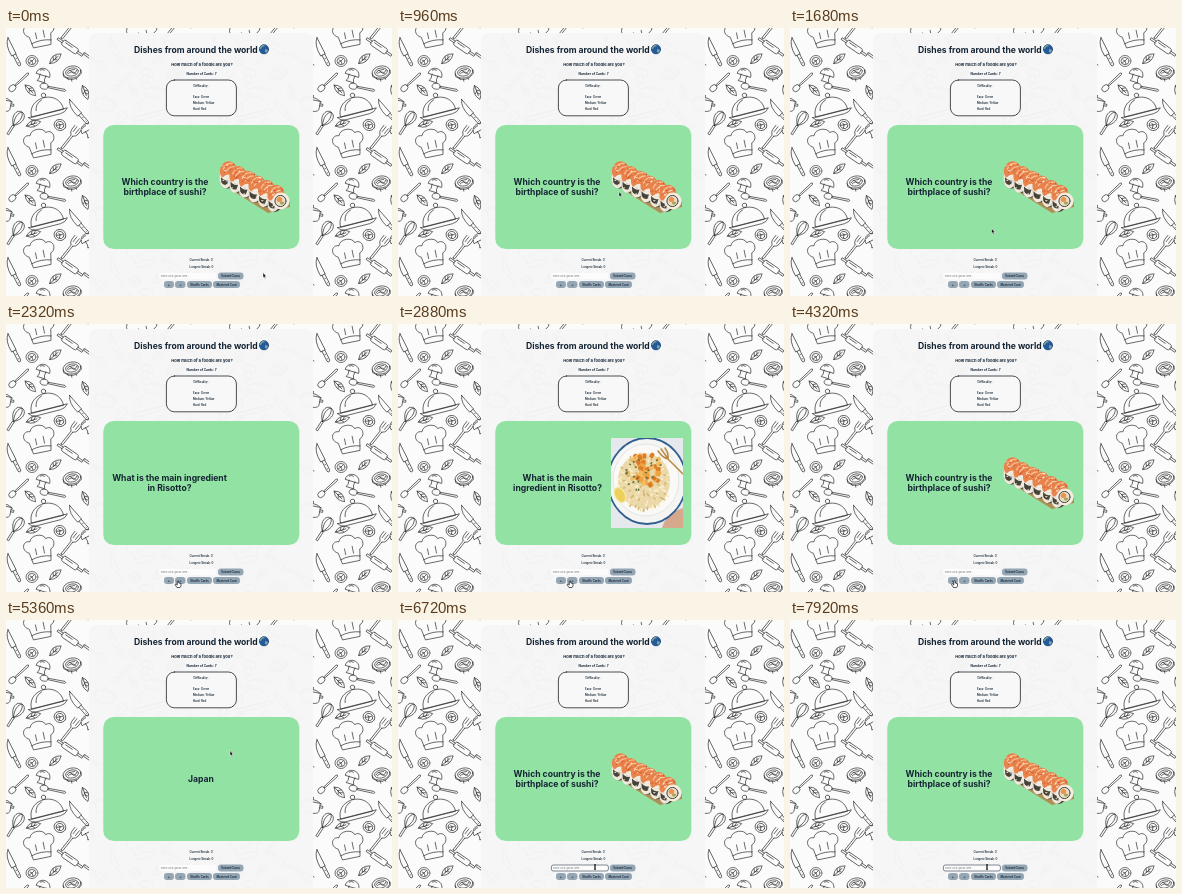
An HTML page with a canvas for the animation above (8 s loop, 386 by 268 pixels).

```html
<!DOCTYPE html>
<html lang="en">
<head>
<meta charset="utf-8">
<title>Dishes from around the world</title>
<style>
html, body { margin: 0; width: 100%; height: 100%; overflow: hidden; background: #fbfbfb; }
canvas { display: block; width: 386px; height: 268px; }
</style>
</head>
<body>
<canvas id="stage"></canvas>
<script>
const W = 386, H = 268, LOOP = 8000, TAU = Math.PI * 2;
const INK = '#142434', GREEN = '#92e2a3';
const canvas = document.getElementById('stage');
const scale = window.devicePixelRatio || 1;
canvas.width = W * scale;
canvas.height = H * scale;
let g = canvas.getContext('2d');

function at(x, y, angle, draw) {
  g.save();
  g.translate(x, y);
  g.rotate(angle);
  draw();
  g.restore();
}
function paint(path, fill, stroke, width) {
  if (fill) { g.fillStyle = fill; g.fill(path); }
  if (stroke) { g.strokeStyle = stroke; g.lineWidth = width; g.stroke(path); }
}
function box(x, y, w, h, r, fill, stroke, width = 1) {
  const path = new Path2D();
  path.roundRect(x, y, w, h, r);
  paint(path, fill, stroke, width);
}
function oval(x, y, rx, ry, fill, stroke, width = 1, angle = 0) {
  const path = new Path2D();
  path.ellipse(x, y, rx, ry, angle, 0, TAU);
  paint(path, fill, stroke, width);
}
function shape(d, fill, stroke, width = 1) {
  paint(new Path2D(d), fill, stroke, width);
}
function text(s, x, y, size, weight = 400, align = 'center', color = INK) {
  g.font = `${weight} ${size}px Inter, sans-serif`;
  g.textAlign = align;
  g.fillStyle = color;
  g.fillText(s, x, y + size * 0.36);
}
// Repeatable pseudo-random numbers.
function random(seed) {
  return () => (seed = (seed * 16807) % 2147483647) / 2147483647;
}

// Kitchen doodles, each drawn around its own centre.
const PEN = '#2b2b2b', NIB = 0.65;
const line = d => shape(d, null, PEN, NIB);
const ring = (rx, ry, y = 0, x = 0) => oval(x, y, rx, ry, null, PEN, NIB);
const doodles = {
  cloche() {
    line('M-17 8C-17-13 16-13 16 8ZM-20 8H20Q17 12 12 12H-13Q-18 12-20 8M-11 3Q-10-4-3-6');
    ring(2.2, 2.2, -10);
  },
  hat() {
    line('M-9 11L-11 0C-19-4-15-14-8-11C-6-18 7-17 8-11C16-14 18-2 11 0L9 11ZM-10 7Q0 4 10 7M-4 3V-3M4 3V-4');
  },
  knife() {
    line('M-15-2H3V3Q-10 4-15-2ZM3-1.5H14Q17 0 14 1.5H3M7 0H7.5M12 0H12.5');
  },
  pin() {
    box(-9, -3, 18, 6, 2, null, PEN, NIB);
    line('M-9-1H-15V1H-9M9-1H15V1H9M-6-1H2');
  },
  whisk() {
    line('M-13-1H-3V1H-13ZM-3 0C4-8 13-6 13 0C13 6 4 8-3 0M-3 0C5-4 10-3 13 0C10 3 5 4-3 0');
  },
  spoon() {
    ring(4, 3, 0, -9);
    line('M-5-.7L12-1Q14 0 12 1L-5 .7');
  },
  roll() {
    ring(9, 6);
    ring(6.5, 4);
    line('M-9 0V3Q0 12 9 3V0M-5 0Q-2-4 0 0T5-1M-4 1Q0-2 3 2M-2-2L3-2M-6 5L-5 7M-2 7V9M3 7V8');
  },
  fork() {
    line('M-13-1H3Q5-4 8-4H13M3 1Q5 4 8 4H13M-13-1Q-15 0-13 1H3M7-1.5H13M7 1.5H13');
  },
  mushroom() {
    line('M-7 0C-7-9 7-9 7 0ZM-3 0Q-2 5-4 7H4Q2 5 3 0M-4-4Q-2-6 0-5');
  },
  tomato() {
    ring(6, 5.5);
    ring(4, 3.6);
    line('M-2-1L0 0L2-2M0 0L1 3M-3 2L0 0');
  },
  leaf() {
    line('M-7 0Q0-7 8 0Q0 6-7 0L4 0M-2 0L0-3M1 0L3-2M-1 0L1 2');
  },
  pot() {
    line('M-9-3V5Q-8 8 0 8Q8 8 9 5V-3ZM-9-1H-12V1H-9M9-1H12V1H9M-10-3Q0-9 10-3M-1-6V-8H1V-6');
  }
};
const tile = [
  ['cloche', 40, 77, -0.25], ['hat', 34, 117, -0.2], ['roll', 66, 44, -0.2],
  ['knife', 72, 84, 0.85], ['pin', 64, 19, 0.6], ['whisk', 9, 95, -1],
  ['spoon', 13, 54, -0.75], ['fork', 64, 110, -0.9], ['mushroom', 37, 47, 0.3],
  ['pot', 99, 75, 0.2], ['knife', 7, 24, 1.1], ['fork', 89, 33, 0.6],
  ['tomato', 26, 33, 0], ['leaf', 49, 31, -0.7], ['leaf', 24, 62, 0.8],
  ['tomato', 54, 97, 0.5], ['spoon', 47, 60, 0.2], ['leaf', 79, 64, 1.2],
  ['mushroom', 82, 102, -0.5], ['leaf', 27, 96, -0.3]
];
function wallpaper() {
  g.fillStyle = '#fbfbfb';
  g.fillRect(0, 0, W, H);
  g.lineCap = g.lineJoin = 'round';
  for (let col = -1; col < 4; col++)
    for (let row = -1; row < 3; row++)
      for (const [name, x, y, angle] of tile)
        at(x + col * 103, y + row * 110, angle, doodles[name]);
}

function globe() {
  g.save();
  g.beginPath();
  g.arc(258, 21.3, 4.8, 0, TAU);
  g.clip();
  g.fillStyle = '#235b9d';
  g.fillRect(253, 16, 10, 11);
  shape('M254 17L258 16.5L259 18L256 19L255 21L253 21ZM259 21L262 22L261 25L259 24Z', '#80a79d');
  g.restore();
  oval(258, 21.3, 4.6, 4.6, null, '#18396d', 0.5);
}

function button(label, x, y, w) {
  box(x, y, w, 7, 3, '#94a5b4');
  text(label, x + w / 2, y + 3.7, 2.8, 600);
}

function page() {
  wallpaper();
  box(83, 5, 224, 270, 7, 'rgba(246,246,246,.97)');
  text('Dishes from around the world', 128, 22.2, 8.6, 700, 'left');
  globe();
  text('How much of a foodie are you?', 196, 36.4, 4.1, 700);
  text('Number of Cards: 7', 195.5, 45.6, 3.2, 700);
  box(160.4, 52, 70, 35.8, 8, '#f8f8f8', '#10151a', 0.75);
  text('Difficulty:', 195, 58, 3.2, 600);
  ['Easy: Green', 'Medium: Yellow', 'Hard: Red'].forEach((s, i) =>
    text(s, 187, 69.1 + i * 6, 2.8, 600, 'left'));
  box(97.3, 97, 196, 124, 10.5, GREEN);
  text('Current Streak: 0', 195, 232.2, 2.8, 600);
  text('Longest Streak: 0', 195.5, 239.2, 2.8, 600);
  box(153, 245, 57, 6, 2, '#fcfcfc');
  text('Place your guess here...', 155, 248.2, 2.5, 400, 'left', '#656c73');
  button('Submit Guess', 212, 244.5, 25.5);
  button('←', 158, 253, 10);
  button('→', 169, 253, 10.5);
  button('Shuffle Cards', 181, 253, 25);
  button('Mastered Card', 207, 253, 27);
}

function sushi() {
  const rnd = random(71);
  const piece = () => {
    oval(0, 3, 8, 11.5, '#3a3a31');
    oval(-1.4, 3, 7, 11.5, '#f1eadf');
    shape('M-7 4Q-3 8 1 6L0 11Q-4 12-6 9Z', '#46443a');
    shape('M-9-2C-9-17 8-15 8-3Q7 3 3 1Q-2-1-5 4Q-8 4-9-2Z', '#e8834c');
    shape('M-6-4Q-4-11 2-11M-3-2Q0-8 5-8', null, '#f9c39c', 1.2);
    for (let k = 0; k < 12; k++)
      oval(rnd() * 13 - 7, rnd() * 11 - 11, 0.8, 0.6, k % 3 ? '#cf5528' : '#fff1de');
    for (let k = 0; k < 8; k++)
      oval(rnd() * 9 - 5, rnd() * 10 + 3, 1, 0.6, '#ded5c4');
  };
  g.lineCap = 'round';
  shape('M214 155L262 185L284 179V174L250 158Z', '#b08f57');
  for (let i = 0; i < 6; i++)
    at(222.5 + i * 9.5, 146 + i * 4.7, 0.15, piece);
  oval(275, 173, 8.5, 8.5, '#f4eee3');
  oval(274.5, 173, 5.6, 5.6, '#e9ddca', '#45443a', 1);
  oval(273.5, 171.5, 2.7, 2.6, '#e9934c');
  oval(276, 175, 2.2, 1.6, '#a4a653');
}

function risotto() {
  const rnd = random(29);
  const scatter = (count, cx, cy, rx, ry, draw) => {
    for (let i = 0; i < count; i++) {
      const a = rnd() * TAU, r = Math.sqrt(rnd());
      at(cx + Math.cos(a) * rx * r, cy + Math.sin(a) * ry * r, a, () => draw(i));
    }
  };
  g.save();
  g.beginPath();
  g.rect(213, 114, 72, 90);
  g.clip();
  g.fillStyle = '#e5e8ec';
  g.fillRect(213, 114, 72, 90);
  shape('M264 204Q267 193 277 187L285 184V204Z', '#d6a98d');
  oval(249, 157, 39, 43, '#f5f5f3', '#315e90', 1.8);
  oval(248, 156, 33, 36, '#faf9f5', '#d9dee0', 0.7);
  oval(246, 157, 26, 28, '#ead8a8');
  scatter(190, 246, 158, 27, 29, i =>
    oval(0, 0, 1.7, 0.8, ['#fbf1d0', '#d5b675', '#f2dfac'][i % 3]));
  scatter(45, 246, 146, 18, 18, i =>
    box(-2.6, -2, 5.2, 4, 1.2, ['#eda33f', '#dd7b28', '#f2bc63'][i % 3]));
  scatter(22, 246, 148, 20, 20, () => oval(0, 0, 1.3, 0.8, '#64723a'));
  oval(222, 171, 5, 8, '#edd05c', '#f6e9a0', 1.2, -0.5);
  g.lineCap = 'round';
  shape('M285 150L270 135M270 135Q265 134 260 127M270 135Q267 130 263 125M270 135Q271 129 267 124', null, '#b98942', 1.5);
  g.restore();
}

const background = document.createElement('canvas');
const photos = {};
function cache(target, draw) {
  const live = g;
  target.width = W * scale;
  target.height = H * scale;
  g = target.getContext('2d');
  g.scale(scale, scale);
  draw();
  g = live;
  return target;
}

const cards = {
  sushi: { lines: ['Which country is the', 'birthplace of sushi?'], x: 159, photo: 'sushi' },
  answer: { lines: ['Japan'], x: 195 },
  loading: { lines: ['What is the main ingredient', 'in Risotto?'], x: 163.5 },
  risotto: { lines: ['What is the main', 'ingredient in Risotto?'], x: 159.5, photo: 'risotto' }
};
const cardTimes = [
  [0, 'sushi'], [1120, 'answer'], [1680, 'sushi'], [2160, 'loading'],
  [2720, 'risotto'], [3600, 'sushi'], [5040, 'answer'], [5600, 'sushi']
];
const route = [
  [0, 257, 245], [160, 257, 245], [800, 221, 164], [1440, 221, 164],
  [2000, 172, 257], [2960, 172, 257], [3280, 164.5, 257], [4480, 164.5, 257],
  [4960, 224, 131], [5600, 224, 131], [6240, 197, 247], [8000, 197, 247]
];
function pointerAt(t) {
  const i = route.findIndex(p => p[0] > t);
  const [t0, x0, y0] = route[i - 1], [t1, x1, y1] = route[i];
  const u = (t - t0) / (t1 - t0), e = u * u * (3 - 2 * u);
  return [x0 + (x1 - x0) * e, y0 + (y1 - y0) * e];
}

function pointer(x, y) {
  const inField = x > 153 && x < 210 && y > 244 && y < 252;
  const onButton = x > 158 && x < 234 && y >= 253;
  at(x, y, 0, () => {
    if (inField) shape('M-1-2.5Q0-2.5 0-1.8V2Q0 2.7-1 2.7M1-2.5Q0-2.5 0-1.8V2Q0 2.7 1 2.7', null, '#111', 0.8);
    else if (onButton) shape('M-.7 0Q0-1 .7 0V2L3 2.6V5L2 6.5H-1L-3 3.5L-2 2.8L-.7 4Z', '#fff', '#111', 0.7);
    else shape('M0-.5V4.8L1.1 3.8L1.9 5.6L2.8 5.2L2 3.5H3.4Z', '#111', '#fff', 0.5);
  });
}

function render(t) {
  g.setTransform(1, 0, 0, 1, 0, 0);
  g.drawImage(background, 0, 0);
  const name = cardTimes.filter(entry => entry[0] <= t).pop()[1];
  const card = cards[name];
  if (card.photo) g.drawImage(photos[card.photo], 0, 0);
  g.setTransform(scale, 0, 0, scale, 0, 0);
  const top = card.lines.length > 1 ? 154.2 : 159.2;
  card.lines.forEach((s, i) => text(s, card.x, top + i * 10, 8.6, 700));
  if (t >= 6480) box(153.4, 245, 57, 6, 2, null, '#2c3c4c', 0.6);
  pointer(...pointerAt(t));
}

cache(background, page);
photos.sushi = cache(document.createElement('canvas'), sushi);
photos.risotto = cache(document.createElement('canvas'), risotto);

const start = performance.now();
function tick() {
  render((performance.now() - start) % LOOP);
  requestAnimationFrame(tick);
}
tick();
</script>
</body>
</html>
```
